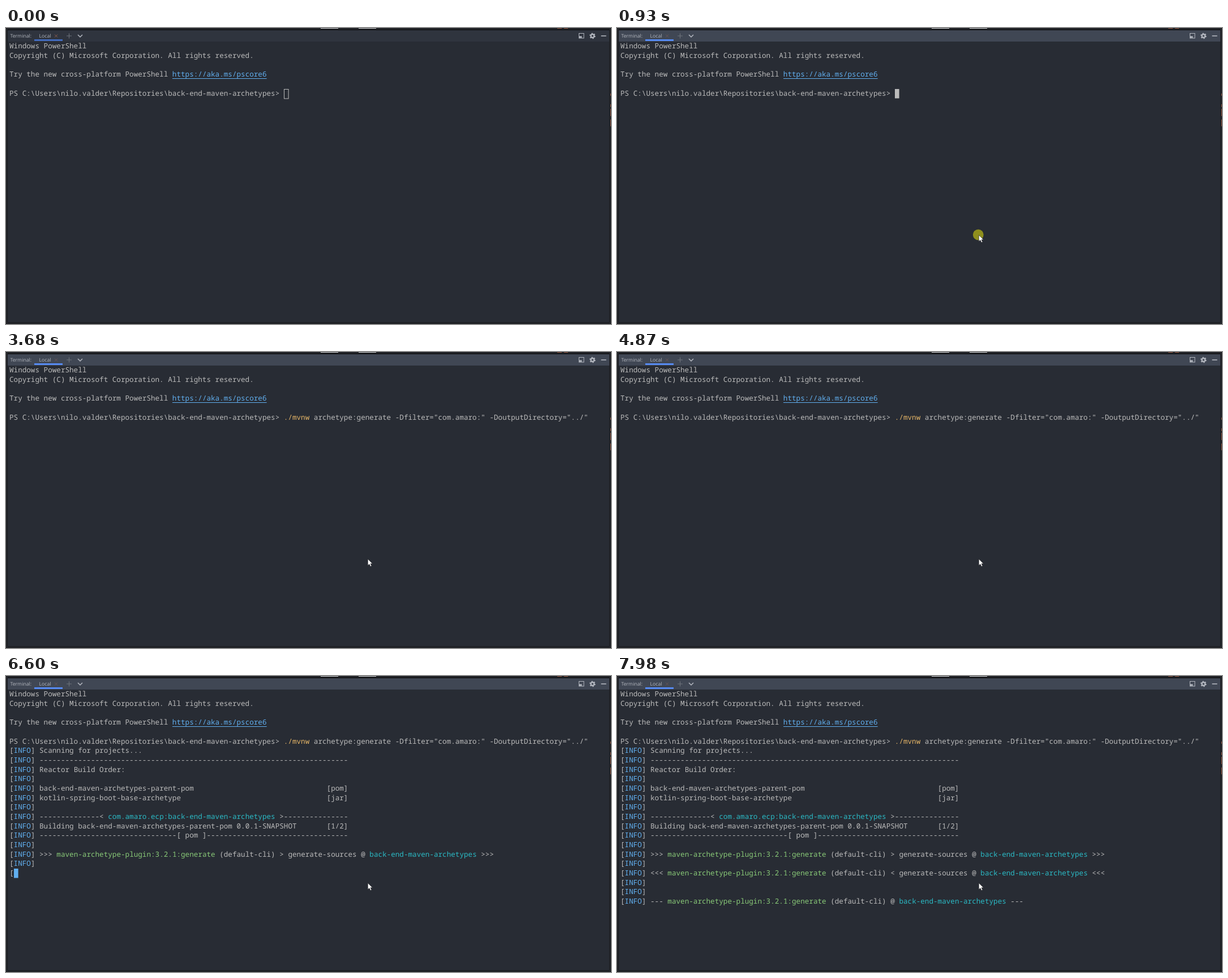
These frames come from a looping animation (1069 by 524 pixels, 8 s). An HTML page:

```html
<!DOCTYPE html>
<html lang="en">
<head>
<meta charset="utf-8">
<title>Terminal</title>
<style>
  html, body { margin: 0; width: 100%; height: 100%; overflow: hidden; background: #121316; }
  svg { display: block; width: 1069px; height: 524px; }
  text { white-space: pre; text-rendering: geometricPrecision; }
  #screen { font: 12.63px "Noto Sans Mono", "DejaVu Sans Mono", monospace; font-variant-ligatures: none; }
  .label { font: 8.7px "Open Sans", "Noto Sans", sans-serif; fill: #b4b8c0; }
</style>
</head>
<body>
<svg viewBox="0 0 1069 524" xmlns="http://www.w3.org/2000/svg">
  <rect width="1069" height="524" fill="#121316"/>
  <rect x="1.5" y="1.5" width="1066" height="521" fill="none" stroke="#33363c"/>
  <rect x="3" y="4" width="1063" height="517" fill="#282c34"/>
  <path d="M556 .5h31M623 .5h31" stroke="#c9c9c9"/>
  <path d="M974 .5h8M986 .5h7M1068.5 116v4M1068.5 135v5M1068.5 143v13M1068.5 162v12" stroke="#8a4a32"/>

  <rect id="bar" x="3" y="4" width="1063" height="20"/>
  <rect id="underline" x="50" y="20" width="50" height="3"/>
  <text class="label" x="7.5" y="17.2">Terminal:</text>
  <text class="label" x="58.5" y="17.2">Local</text>
  <path id="close" d="M86 11.5l5 5m0-5l-5 5" fill="none"/>
  <path d="M107 14h9M111.5 9.5v9" stroke="#6f747d"/>
  <path d="M127 12l4 4 4-4" fill="none" stroke="#b4b8c0" stroke-width="1.5"/>
  <g fill="none" stroke="#b4b8c0">
    <rect x="1012.5" y="9.5" width="8.5" height="8.5"/>
    <path d="M1013 16h4.5" stroke-width="3"/>
    <circle cx="1036.3" cy="14" r="2.9" stroke-width="2.2"/>
    <circle cx="1036.3" cy="14" r="4.5" stroke-width="1.6" stroke-dasharray="2.2 2.512"/>
    <path d="M1051.5 14h9" stroke-width="1.6"/>
  </g>

  <g id="screen"></g>
  <rect id="caret"/>
  <circle id="click" cx="638.3" cy="366" r="9.4" fill="#8f8f1d"/>
  <path id="pointer" d="M0 0V11.6L2.7 9.1L4.6 13.2L6.6 12.3L4.8 8.3H8.3Z" fill="#fff" stroke="#16181c" stroke-width=".6"/>
</svg>
<script>
const LOOP = 8000, CELL = 7.578, LEFT = 6, TOP = 24.65, ROW = 16.67;
const GRAY = '#bbbbbb', BLUE = '#61afef', CYAN = '#2bbac5', GREEN = '#89ca78', YELLOW = '#e5b567';
const el = id => document.getElementById(id);

const NAME = 'back-end-maven-archetypes';
const PLUGIN = 'maven-archetype-plugin:3.2.1:generate';
const plain = text => [text, GRAY];
const info = (...parts) => [plain('['), ['INFO', BLUE], plain('] '),
  ...parts.map(p => typeof p === 'string' ? plain(p) : p)];
const column = (text, tag) => info(text.padEnd(67) + tag);
const goal = (mark, middle) =>
  info(mark + ' ', [PLUGIN, GREEN], ` (default-cli) ${middle}@ `, [NAME, CYAN], ' ' + mark);
const dashes = n => '-'.repeat(n);

const lines = [
  [plain('Windows PowerShell')],
  [plain('Copyright (C) Microsoft Corporation. All rights reserved.')],
  [],
  [plain('Try the new cross-platform PowerShell '), ['https://aka.ms/pscore6', BLUE, true]],
  [],
  [plain(`PS C:\\Users\\nilo.valder\\Repositories\\${NAME}> `), ['./mvnw', YELLOW],
    plain(' archetype:generate -Dfilter="com.amaro:" -DoutputDirectory="../"')],
  info('Scanning for projects...'),
  info(dashes(72)),
  info('Reactor Build Order:'),
  info(),
  column(NAME + '-parent-pom', '[pom]'),
  column('kotlin-spring-boot-base-archetype', '[jar]'),
  info(),
  info(dashes(14) + '< ', ['com.amaro.ecp:' + NAME, CYAN], ' >' + dashes(15)),
  column(`Building ${NAME}-parent-pom 0.0.1-SNAPSHOT`, '[1/2]'),
  info(dashes(32) + '[ pom ]' + dashes(33)),
  info(),
  goal('>>>', '> generate-sources '),
  info(),
  goal('<<<', '< generate-sources '),
  info(),
  info(),
  goal('---', '')
];

// time, row and column of the caret, caret visible
const steps = [
  [0, 5, 64, 1], [1400, 5, 64, 0], [1530, 5, 135, 1], [2600, 5, 135, 0], [3150, 5, 135, 1],
  [3680, 5, 135, 0], [3810, 6, 0, 1], [4870, 6, 0, 0], [5330, 6, 0, 1], [5730, 7, 0, 1],
  [5930, 12, 0, 1], [6390, 12, 0, 0], [6460, 13, 23, 1], [6530, 17, 11, 1], [6600, 19, 1, 1],
  [6670, 19, 11, 1], [6740, 19, 48, 1], [6800, 19, 83, 1], [6870, 20, 1, 1], [6940, 20, 7, 1],
  [7000, 21, 1, 1], [7100, 21, 7, 1], [7170, 22, 0, 1], [7240, 22, 7, 1], [7310, 22, 48, 1],
  [7380, 22, 94, 1], [7450, 23, 0, 1], [7980, 23, 0, 0]
];
// time, x and y of the pointer tip
const moves = [[470, 652, 441], [530, 646, 408], [600, 641, 378], [670, 639.3, 366.5]];

const latest = (list, t) => list.filter(item => item[0] <= t).pop();

const escape = text => text.replace(/&/g, '&amp;').replace(/</g, '&lt;');

function lineMarkup(line, row, limit) {
  const y = TOP + row * ROW + 11.7;
  let used = 0, spans = '', rules = '';
  for (const [text, color, link] of line) {
    const part = text.slice(0, Math.max(0, limit - used));
    if (link) {
      rules = `<path d="M${LEFT + used * CELL} 89.5h${part.length * CELL}" stroke="${color}"/>`;
    }
    spans += `<tspan fill="${color}">${escape(part)}</tspan>`;
    used += text.length;
  }
  return `<text x="${LEFT}" y="${y}">${spans}</text>${rules}`;
}

function colorAt(row, col) {
  if (row < 6) return GRAY;
  let used = 0;
  for (const [text, color] of lines[row] || []) {
    used += text.length;
    if (col < used) return color;
  }
  return GRAY;
}

const setAttrs = (id, attrs) => {
  for (const key in attrs) el(id).setAttribute(key, attrs[key]);
};
const show = (id, on) => setAttrs(id, { visibility: on ? 'visible' : 'hidden' });

let drawn = '';
function render(t) {
  const [, row, col, caretOn] = latest(steps, t);
  const focused = (t >= 70 && t < 270) || t >= 930;

  const key = row + ':' + col;
  if (key !== drawn) {
    drawn = key;
    el('screen').innerHTML = lines.slice(0, row + 1)
      .map((line, i) => lineMarkup(line, i, i < row ? Infinity : col)).join('');
  }

  setAttrs('bar', { fill: focused ? '#404754' : '#2f343e' });
  setAttrs('underline', { fill: focused ? '#568af2' : '#426bbd' });
  setAttrs('close', { stroke: t < 70 ? '#8d5f50' : focused ? '#6a5658' : '#6b444a' });

  const inset = focused ? 0 : 0.5, color = colorAt(row, col);
  setAttrs('caret', {
    x: Math.round(LEFT + col * CELL) + inset,
    y: Math.round(TOP + row * ROW - 0.3) + inset,
    width: 7.6, height: 16.5,
    fill: focused ? color : 'none',
    stroke: focused ? 'none' : color
  });
  show('caret', caretOn);
  show('click', t >= 870 && t < 1000);

  const move = latest(moves, t);
  show('pointer', move);
  if (move) setAttrs('pointer', { transform: `translate(${move[1]} ${move[2]})` });
}

const start = performance.now();
function tick() {
  render((performance.now() - start) % LOOP);
  requestAnimationFrame(tick);
}
tick();
</script>
</body>
</html>
```
